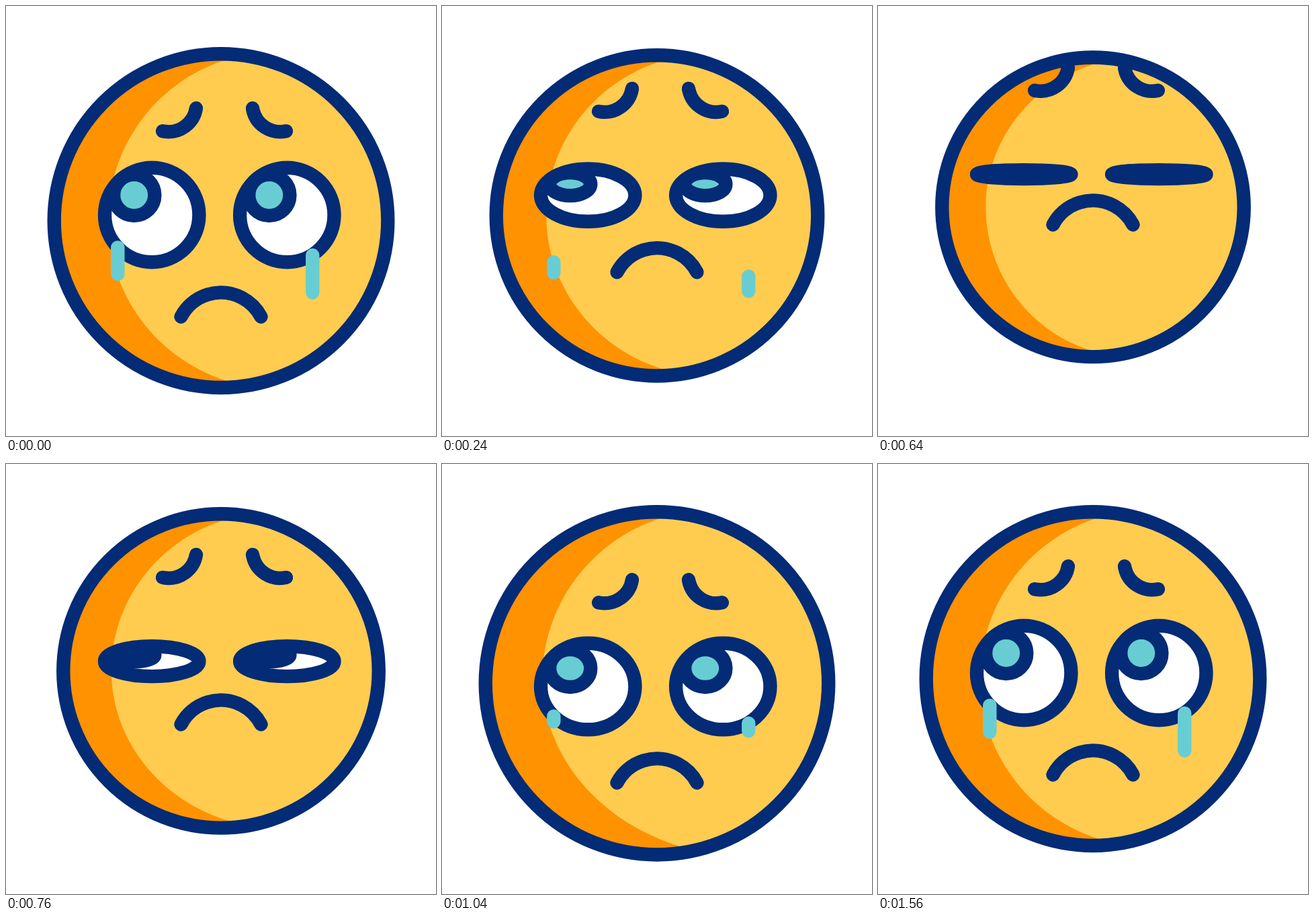
Animation, 640 px wide and 640 px high, one loop 2 s. Source, as an HTML page with a canvas:

```html
<!DOCTYPE html>
<html lang="en">
<head>
<meta charset="utf-8">
<title>Crying face</title>
<style>
  html, body { margin: 0; width: 100%; height: 100%; overflow: hidden; background: #fff; }
  canvas { display: block; width: 640px; height: 640px; }
</style>
</head>
<body>
<canvas id="stage" width="640" height="640"></canvas>
<script>
const ctx = document.getElementById('stage').getContext('2d');
const NAVY = '#032b76', YELLOW = '#ffcc50', ORANGE = '#ff9200', TEAL = '#68cdd2';
const LINE = 20.4, LOOP = 2000, STEP = 40;

// Every part sinks to a low, swings past its rest position to a high, then settles.
const CHIN = { low: -51.5, high: 13.5, start: 40, valley: 550, peak: 1045, leave: 1050, rest: 1370 };
const SHADE = { low: -25, high: 34, start: 240, valley: 480, peak: 1040, leave: 1040, rest: 1350 };
const LIFT = { low: -73.5, high: 21.4, start: 0, valley: 555, peak: 920, leave: 960, rest: 1480 };
const MOUTH = { low: -159, high: 12, start: 0, valley: 540, peak: 985, leave: 1070, rest: 1560 };

function ease(from, to, t) {
  const u = Math.min(1, Math.max(0, (t - from) / (to - from)));
  return u * u * (3 - 2 * u);
}

function swing(move, t) {
  const rise = ease(move.valley, move.peak, t);
  return move.low * (ease(move.start, move.valley, t) - rise)
       + move.high * (rise - ease(move.leave, move.rest, t));
}

function oval(x, y, rx, ry, fill) {
  ctx.beginPath();
  ctx.ellipse(x, y, rx, Math.max(ry, 0.2), 0, 0, Math.PI * 2);
  if (fill) {
    ctx.fillStyle = fill;
    ctx.fill();
  }
  ctx.strokeStyle = NAVY;
  ctx.stroke();
}

function arc(x, y, r, from, to) {
  const rad = Math.PI / 180;
  ctx.beginPath();
  ctx.arc(x, y, r, from * rad, to * rad);
  ctx.strokeStyle = NAVY;
  ctx.stroke();
}

function drawHead(t) {
  const chin = swing(CHIN, t), squash = Math.min(chin, 0);
  const top = 71.2 - 0.115 * squash, bottom = 568 + chin;
  const cy = (top + bottom) / 2, ry = (bottom - top) / 2, rx = 248.3 + 0.515 * chin;

  ctx.save();
  ctx.beginPath();
  ctx.ellipse(320, cy, rx, ry, 0, 0, Math.PI * 2);
  ctx.clip();
  ctx.fillStyle = YELLOW;
  ctx.fillRect(0, 0, 640, 640);

  // Crescent shadow: its inner edge runs from the crown over the leftmost point to the chin.
  const x0 = 323 + 0.05 * squash, y0 = top + 10.2;
  const x1 = 152 - 0.185 * chin, y1 = Math.min(cy, 320);
  const x2 = 326 + swing(SHADE, t), y2 = bottom - 10.8;
  const near = (x, y) => [x1 + 0.405 * (x - x1), y + 0.143 * (y1 - y)];
  const side = y => y1 + 0.454 * (y - y1);
  ctx.beginPath();
  ctx.moveTo(x0 + 30, y0 - 10);
  ctx.lineTo(x0, y0);
  ctx.bezierCurveTo(...near(x0, y0), x1, side(y0), x1, y1);
  ctx.bezierCurveTo(x1, side(y2), ...near(x2, y2), x2, y2);
  ctx.lineTo(x2 + 30, y2 + 10);
  ctx.lineTo(0, 640);
  ctx.lineTo(0, 0);
  ctx.fillStyle = ORANGE;
  ctx.fill();
  ctx.restore();

  oval(320, cy, rx, ry);
}

function drawEye(x, y, open) {
  oval(x, y, 70.2, 70.2 * open, '#fff');
  oval(x - 26.5, y - 29.5 * open, 30.6, 30.6 * open, TEAL);
}

// Old tears shrink from the top as the eyes close; new ones grow out of the opening eyes.
function drawTear(x, offset, length, t, eyeY, open) {
  const closing = t < 520;
  const root = closing ? 311 + offset - t / 120 : eyeY + offset * open;
  const from = closing ? root + length * ease(0, 422, t) : root;
  const to = closing ? root + length : root + length * ease(933, 1300, t);
  if (to - from < 0.05) return;
  ctx.beginPath();
  ctx.moveTo(x, from);
  ctx.lineTo(x, to);
  ctx.strokeStyle = TEAL;
  ctx.stroke();
}

function draw(t) {
  const lift = swing(LIFT, t), eyeY = 311 + lift;
  const open = 1 - ease(0, 520, t) + ease(522, 1153, t);

  ctx.fillStyle = '#fff';
  ctx.fillRect(0, 0, 640, 640);
  ctx.lineWidth = LINE;
  ctx.lineCap = ctx.lineJoin = 'round';

  drawHead(t);
  arc(242, 145.7 + lift, 41.5, 9, 102.5);
  arc(408, 145.7 + lift, 41.5, 77.5, 171);
  arc(320, 493.7 + swing(MOUTH, t), 67.2, 207.7, 332.3);
  drawEye(217.2, eyeY, open);
  drawEye(418.3, eyeY, open);
  drawTear(166.3, 48.5, 39.5, t, eyeY, open);
  drawTear(456.3, 60, 55.5, t, eyeY, open);
}

const start = performance.now();
function tick() {
  const t = (performance.now() - start) % LOOP;
  draw(Math.floor(t / STEP) * STEP);
  requestAnimationFrame(tick);
}
tick();
</script>
</body>
</html>
```
